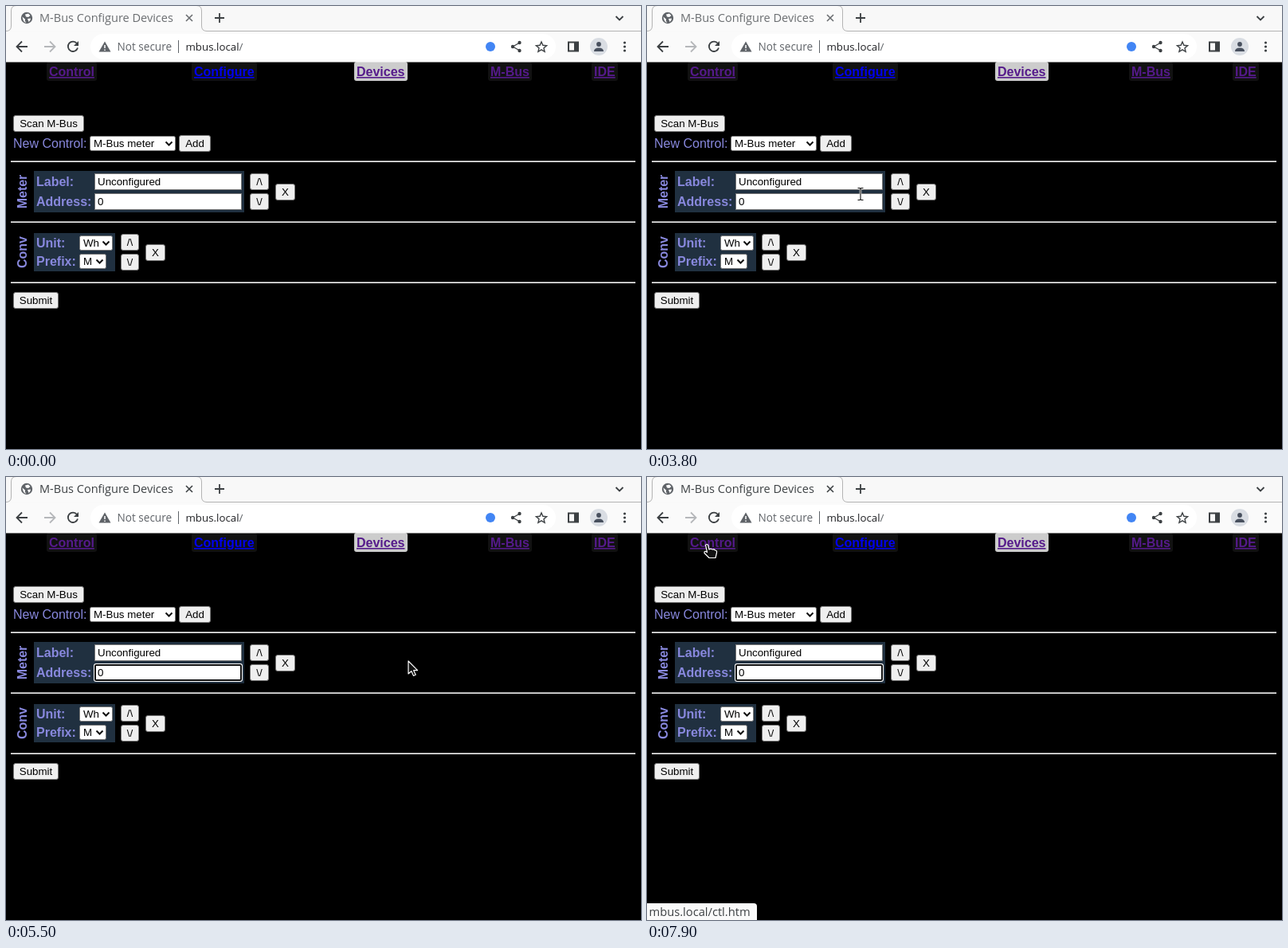
An HTML page that plays this animation: 797 by 556 pixels, repeating every 8 s.

```html
<!DOCTYPE html>
<html lang="en">
<head>
<meta charset="utf-8">
<title>M-Bus Configure Devices</title>
<style>
  html, body { margin: 0; width: 100%; height: 100%; overflow: hidden; background: #000; }
  svg { display: block; width: 797px; height: 556px; }
  text { font: 13.333px "Liberation Sans", Arial, sans-serif; }
  .ui { font-family: "Open Sans", "Noto Sans", sans-serif; }
  .body { font-size: 16px; fill: #8888dd; }
  .bold { font-size: 16px; font-weight: bold; fill: #8888dd; }
  .link { font-size: 16px; font-weight: bold; text-decoration: underline; }
  .line { fill: none; stroke: #3c4043; stroke-width: 1.8; }
</style>
</head>
<body>
<svg id="stage" viewBox="0 0 797 556">
  <rect width="797" height="556"/>
  <g id="page"></g>

  <g id="browser">
    <rect width="797" height="70.5" fill="#fafafa"/>
    <rect width="797" height="31" fill="#f8f8f8"/>
    <path d="M0 31.5Q6.500 31.500 6.500 25V6Q6.500 -.500 13 -.500H239Q245.500 -.500 245.500 6V25Q245.500 31.500 252 31.500H797"
          fill="#fafafa" stroke="#b4b4b4"/>
    <rect y="32" width="797" height="2" fill="#fafafa"/>
    <circle cx="26" cy="15" r="7.200" fill="#5f6368"/>
    <path d="M20.500 13.500L24 16.500V19L25.500 21Q21 20 20.500 13.500ZM24 10.500L28 9.500L30.500 12L28 14L25 13.500ZM27 16L31 15.500Q31 18.500 28.500 20Z" fill="#fafafa"/>
    <g id="tabTitle">
      <text class="ui" x="42" y="20" style="font-size:14.5px">M-Bus Configure Devices</text>
      <path d="M226 11L234 19M234 11L226 19" stroke="currentColor" stroke-width="1.600"/>
    </g>
    <path class="line" d="M262 15H274M268 9V21M765.500 13L770 17.500L774.500 13"/>

    <path class="line" d="M27 51H14M20 44.500L13.500 51L20 57.500"/>
    <path class="line" d="M48 51H61M55 44.500L61.500 51L55 57.500" style="stroke:#b5b7ba"/>
    <path class="line" d="M89 47A6.200 6.200 0 1 0 90 52.500"/>
    <path d="M91 44V50H85Z" fill="#3c4043"/>
    <rect x="106" y="35" width="584" height="32" rx="16" fill="#fff"/>
    <path d="M124 44.500L131.500 57.500H116.500Z" fill="#5f6368"/>
    <path d="M124 49V53M124 54.500V56" stroke="#fff" stroke-width="1.500"/>
    <text class="ui" x="139.500" y="56" fill="#5f6368" style="font-size:13.6px">Not secure</text>
    <path d="M216.500 43V59" stroke="#5f6368"/>
    <text class="ui" x="225.500" y="56" fill="#202124" style="font-size:13.3px">mbus.local<tspan fill="#5f6368">/</tspan></text>
    <circle cx="608" cy="51" r="6" fill="#4285f4"/>
    <path class="line" d="M644 46.500L636 51L644 55.500" style="stroke-width:1.300"/>
    <g fill="#3c4043">
      <circle cx="644.500" cy="46" r="2.200"/><circle cx="636" cy="51" r="2.200"/><circle cx="644.500" cy="56" r="2.200"/>
      <path d="M705 44.500H719V57.500H705ZM707 46.500V55.500H713V46.500Z" fill-rule="evenodd"/>
      <circle cx="776.500" cy="46" r="1.600"/><circle cx="776.500" cy="51" r="1.600"/><circle cx="776.500" cy="56" r="1.600"/>
    </g>
    <path class="line" d="M672 45L673.900 49.300L678.600 49.700L675 52.800L676.100 57.300L672 54.900L667.900 57.300L669 52.800L665.400 49.700L670.100 49.300Z" style="stroke-width:1.400"/>
    <circle cx="744" cy="51" r="11" fill="#d9dde3"/>
    <circle cx="744" cy="48" r="2.900" fill="#48505e"/>
    <path d="M738 57Q738 52.500 744 52.500T750 57Z" fill="#48505e"/>
  </g>

  <rect id="hover" x="111.500" y="235.500" width="184" height="20" fill="none" stroke="#4f4f4f"/>
  <g id="focus">
    <rect x="110" y="234" width="187" height="23" rx="3" fill="#fff"/>
    <rect x="112" y="236" width="183" height="19" rx="1.500" fill="#fff" stroke="#101010" stroke-width="2"/>
    <text x="115" y="250">0</text>
  </g>
  <rect id="caret" x="122.500" y="238" width="1" height="15"/>

  <g id="status">
    <path d="M0 535H134Q138 535 138 539V556H0Z" fill="#fafafa"/>
    <text class="ui" x="2.500" y="551" fill="#3c4043" style="font-size:14.7px">mbus.local/ctl.htm</text>
  </g>

  <path id="arrow" d="M0 0V16L3.800 12.700L6.500 18.500L9.200 17.300L6.600 11.700H11.500Z" fill="#111" stroke="#fff" stroke-width="1.200" stroke-linejoin="round"/>
  <g id="beam" fill="none">
    <path d="M-3.500 -7.500H-1L0 -6.500L1 -7.500H3.500M0 -7V7M-3.500 7.500H-1L0 6.500L1 7.500H3.500" stroke="#fff" stroke-width="2.600"/>
    <path d="M-3.500 -7.500H-1L0 -6.500L1 -7.500H3.500M0 -7V7M-3.500 7.500H-1L0 6.500L1 7.500H3.500" stroke="#111" stroke-width="1.100"/>
  </g>
  <path id="hand" d="M-1.500 1.500Q0 -.500 1.700 1.500L3 7L5 6L7 7L9 6.700L10.700 8Q13 8 12.500 11L11 17.500H3L-3 11.500Q-3.500 9 -1 9.500L.500 10.500Z"
        fill="#111" stroke="#fff" stroke-width="1.200" stroke-linejoin="round"/>
</svg>

<script>
const LOOP = 8000;
const $ = id => document.getElementById(id);
const page = $('page');

function add(tag, attrs, content = '') {
  const el = document.createElementNS('http://www.w3.org/2000/svg', tag);
  for (const key in attrs) el.setAttribute(key, attrs[key]);
  el.textContent = content;
  page.append(el);
}
const rect = (x, y, width, height, fill, more) => add('rect', { x, y, width, height, fill, ...more });
const text = (x, y, content, more) => add('text', { x, y, ...more }, content);
const framed = (x, y, w, h, fill, rx) => rect(x + .5, y + .5, w - 1, h - 1, fill, { rx, stroke: '#767676' });

function button(x, y, w, label) {
  framed(x, y, w, 21, '#efefef', 2.5);
  text(x + w / 2, y + 15, label, { 'text-anchor': 'middle' });
}
function input(y, value) {
  framed(111, y, 185, 21, '#fff', 0);
  text(115, y + 15, value);
}
function select(x, y, w, value) {
  framed(x, y, w, 19, '#fff', 2);
  text(x + 5, y + 14, value);
  add('path', { d: `M${x + w - 12.5} ${y + 7.5}l4 4l4 -4`, fill: 'none', stroke: '#111', 'stroke-width': 2 });
}
function sideLabel(y, label) {
  text(0, 0, label, { class: 'bold', 'text-anchor': 'middle', transform: `translate(25.5 ${y}) rotate(-90)` });
}
function mover(x, y, w) {
  button(x, y, w, '/\\');
  button(x, y + 25, w, '\\/');
}

// Navigation
for (const [x, w, label, color, fill] of [
  [51, 63, 'Control', '#551a8b', '#111'],
  [233, 82, 'Configure', '#0000ee', '#111'],
  [437, 67, 'Devices', '#551a8b', '#ccc'],
  [605, 55, 'M-Bus', '#551a8b', '#111'],
  [735, 33, 'IDE', '#551a8b', '#111']
]) {
  rect(x, 70, w, 24, fill, { rx: 3 });
  text(x + 3, 88, label, { class: 'link', fill: color });
}

// Form
button(9, 137, 89, 'Scan M-Bus');
text(9, 178, 'New Control:', { class: 'body' });
select(105, 163, 108, 'M-Bus meter');
button(217, 162, 40, 'Add');
for (const y of [194, 270, 346]) {
  rect(6, y, 784, 1, '#9a9a9a');
  rect(6, y + 1, 784, 1, '#eee');
}

sideLabel(233, 'Meter');
rect(35, 207, 264, 52, '#203040');
text(38, 226, 'Label:', { class: 'bold' });
text(38, 251, 'Address:', { class: 'bold' });
input(210, 'Unconfigured');
input(235, '0');
mover(306, 210, 24);
button(338, 223, 25, 'X');

sideLabel(309, 'Conv');
rect(35, 285, 102, 48, '#203040');
text(38, 303, 'Unit:', { class: 'bold' });
text(38, 326, 'Prefix:', { class: 'bold' });
select(92, 288, 42, 'Wh');
select(92, 311, 34, 'M');
mover(144, 286, 23);
button(175, 299, 25, 'X');
button(9, 359, 57, 'Submit');

// Each table row holds its value until the next row's time
function play(el, rows, toStyle) {
  const frames = rows.map(row => ({ offset: row[0] / LOOP, easing: 'step-end', ...toStyle(row) }));
  frames.push({ ...frames.at(-1), offset: 1 });
  el.animate(frames, { duration: LOOP, iterations: Infinity });
}
const fade = ([, opacity]) => ({ opacity });

const pointer = [
  [0, 'none', 0, 0],
  [500, 'arrow', 102, 11], [600, 'arrow', 300, 150], [700, 'arrow', 450, 300], [800, 'arrow', 506, 361],
  [1100, 'arrow', 440, 318], [1200, 'arrow', 365, 262], [1300, 'arrow', 321, 221],
  [1500, 'beam', 264, 236], [3800, 'beam', 268, 236],
  [4300, 'beam', 240, 235], [4400, 'beam', 195, 234], [4500, 'beam', 168, 236], [4700, 'beam', 162, 240],
  [4900, 'beam', 160, 242], [5000, 'beam', 170, 243], [5100, 'arrow', 318, 243],
  [5200, 'arrow', 460, 235], [5300, 'arrow', 505, 231],
  [6900, 'arrow', 430, 205], [7000, 'arrow', 255, 145], [7100, 'arrow', 135, 97],
  [7200, 'arrow', 105, 96], [7300, 'hand', 86, 88], [7400, 'hand', 77, 85], [7500, 'hand', 75, 84]
];
for (const kind of ['arrow', 'beam', 'hand'])
  play($(kind), pointer, ([, shown, x, y]) => ({
    opacity: +(shown === kind),
    transform: `translate(${x}px, ${y}px)`
  }));

play($('tabTitle'), [[0, '#6a6d70'], [4900, '#3c4043']], ([, color]) => ({ color, fill: color }));
play($('hover'), [[0, 0], [4400, 1], [5000, 0]], fade);
play($('focus'), [[0, 0], [5000, 1]], fade);
play($('caret'), [[0, 0], [5000, 1], [5500, 0], [6100, 1], [6700, 0], [7300, 1], [7900, 0]], fade);
play($('status'), [[0, 0], [7700, .3], [7800, .75], [7900, 1]], fade);
</script>
</body>
</html>
```
